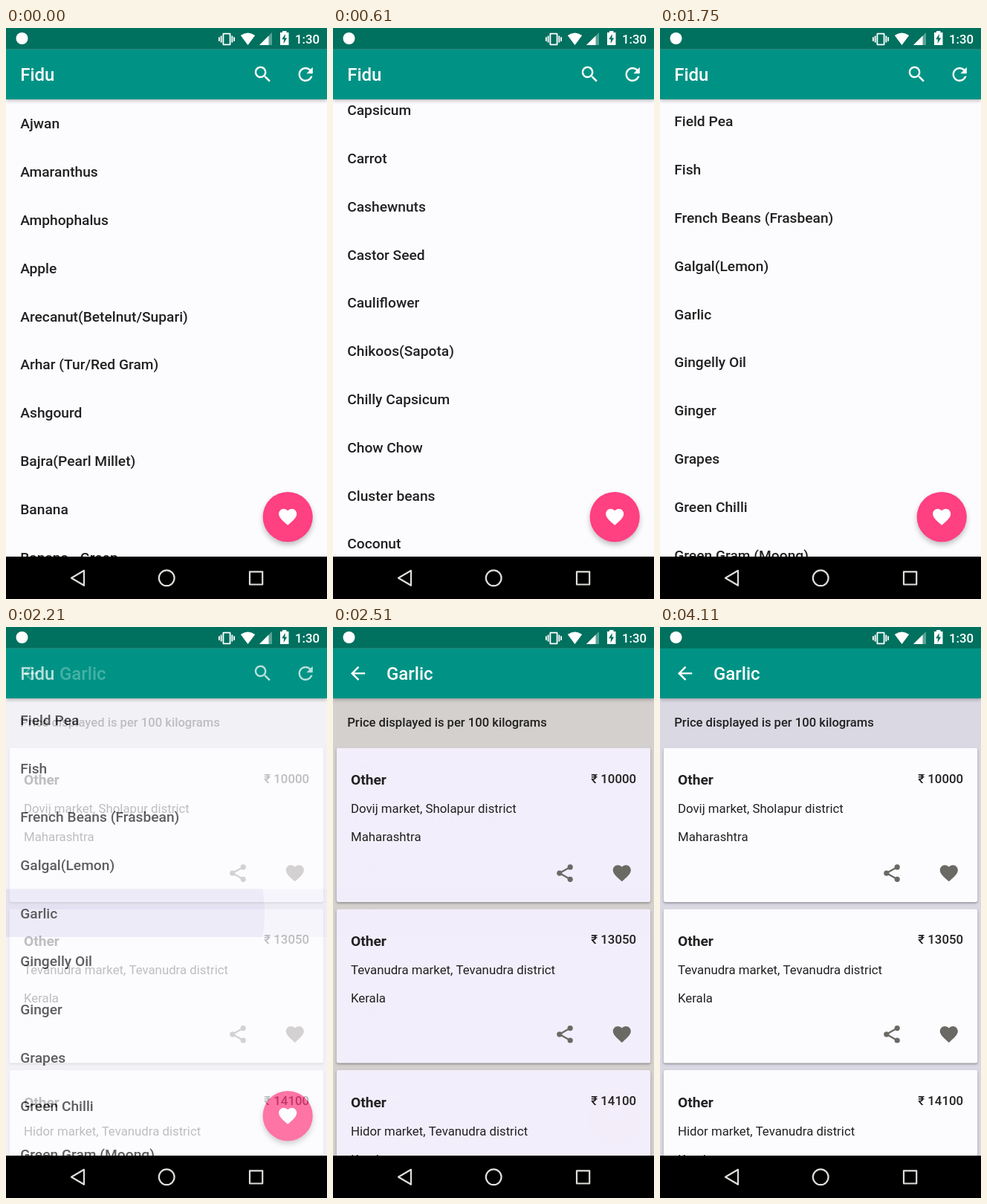
Animation of 432x768 px, one loop 5.1 s. Source, as an HTML page with a canvas:

```html
<!DOCTYPE html>
<html lang="en">
<head>
<meta charset="utf-8">
<title>Market prices</title>
<style>
  html, body { margin: 0; width: 100%; height: 100%; overflow: hidden; background: #000; }
  canvas { display: block; width: 432px; height: 768px; }
</style>
</head>
<body>
<canvas id="stage" width="432" height="768"></canvas>
<script>
const W = 432, H = 768, LOOP = 5100;
const STATUS_H = 28.8, BAR_END = 96, NAV_TOP = 711, ROW = 64.8;
const SCROLL_END = 3048.6;
const GREEN = '#009385', INK = '#212121', PAPER = '#fcfbfe';

const CROPS = ['Ajwan', 'Amaranthus', 'Amphophalus', 'Apple', 'Arecanut(Betelnut/Supari)',
  'Arhar (Tur/Red Gram)', 'Ashgourd', 'Bajra(Pearl Millet)', 'Banana', 'Banana - Green',
  'Beans', 'Beetroot', 'Bengal Gram(Gram)', 'Betal Leaves', 'Bhindi(Ladies Finger)',
  'Bitter gourd', 'Black Gram (Urd Beans)', 'Black pepper', 'Bottle gourd', 'Brinjal',
  'Bull', 'Cabbage', 'Capsicum', 'Carrot', 'Cashewnuts', 'Castor Seed', 'Cauliflower',
  'Chikoos(Sapota)', 'Chilly Capsicum', 'Chow Chow', 'Cluster beans', 'Coconut',
  'Coconut Oil', 'Coconut Seed', 'Coffee', 'Colacasia', 'Copra', 'Coriander(Leaves)',
  'Corriander seed', 'Cotton', 'Cowpea(Veg)', 'Cucumbar(Kheera)', 'Cummin Seed(Jeera)',
  'Drumstick', 'Dry Chillies', 'Duster Beans', 'Elephant Yam (Suran)', 'Field Pea', 'Fish',
  'French Beans (Frasbean)', 'Galgal(Lemon)', 'Garlic', 'Gingelly Oil', 'Ginger', 'Grapes',
  'Green Chilli', 'Green Gram (Moong)', 'Green Peas'];

const OFFERS = [
  ['₹ 10000', 'Dovij market, Sholapur district', 'Maharashtra'],
  ['₹ 13050', 'Tevanudra market, Tevanudra district', 'Kerala'],
  ['₹ 14100', 'Hidor market, Tevanudra district', 'Kerala']
];

// The picture only changes at these moments.
const STEPS = [0, 230, 310, 380, 460, 530, 610, 690, 760, 840, 920, 990, 1070, 1290,
  1750, 1830, 1900, 1980, 2060, 2130, 2210, 2280, 2360, 2430, 2510, 2590, 2660, 3120];

const ICONS = {
  heart: 'M12 21.35l-1.45-1.32C5.4 15.36 2 12.28 2 8.5 2 5.42 4.42 3 7.5 3c1.74 0 3.41.81 4.5 2.09C13.09 3.81 14.76 3 16.5 3 19.58 3 22 5.42 22 8.5c0 3.78-3.4 6.86-8.55 11.54L12 21.35z',
  search: 'M15.5 14h-.79l-.28-.27C15.41 12.59 16 11.11 16 9.5 16 5.91 13.09 3 9.5 3S3 5.91 3 9.5 5.91 16 9.5 16c1.61 0 3.09-.59 4.23-1.57l.27.28v.79l5 4.99L20.49 19l-4.99-5zm-6 0C7.01 14 5 11.99 5 9.5S7.01 5 9.5 5 14 7.01 14 9.5 11.99 14 9.5 14z',
  refresh: 'M17.65 6.35C16.2 4.9 14.21 4 12 4c-4.42 0-7.99 3.58-7.99 8s3.57 8 7.99 8c3.73 0 6.84-2.55 7.73-6h-2.08c-.82 2.33-3.04 4-5.65 4-3.31 0-6-2.69-6-6s2.69-6 6-6c1.66 0 3.14.69 4.22 1.78L13 11h7V4l-2.35 2.35z',
  back: 'M20 11H7.83l5.59-5.59L12 4l-8 8 8 8 1.41-1.41L7.83 13H20v-2z',
  vibrate: 'M0 15h2V9H0zM3 17h2V7H3zM22 9v6h2V9zM19 17h2V7h-2zM16.5 3h-9C6.67 3 6 3.67 6 4.5v15c0 .83.67 1.5 1.5 1.5h9c.83 0 1.5-.67 1.5-1.5v-15c0-.83-.67-1.5-1.5-1.5zM16 19H8V5h8z'
};
for (const name in ICONS) ICONS[name] = new Path2D(ICONS[name]);

const stage = document.getElementById('stage').getContext('2d');
const clamp = x => Math.max(0, Math.min(1, x));

function text(c, str, x, y, size, weight, color, align = 'left') {
  c.font = `${weight} ${size}px Roboto, sans-serif`;
  c.textAlign = align;
  c.fillStyle = color;
  c.fillText(str, x, y);
}

function icon(c, name, cx, cy, color, scale = 1.2) {
  c.save();
  c.translate(cx, cy);
  c.scale(scale, scale);
  c.translate(-12, -12);
  c.fillStyle = color;
  c.fill(ICONS[name], 'evenodd');
  c.restore();
}

function rect(c, x, y, w, h, color) {
  c.fillStyle = color;
  c.fillRect(x, y, w, h);
}

function disc(c, x, y, r, color) {
  c.fillStyle = color;
  c.beginPath();
  c.arc(x, y, r, 0, 7);
  c.fill();
}

function poly(c, points) {
  c.beginPath();
  points.forEach(p => c.lineTo(p[0], p[1]));
  c.closePath();
}

function shadow(c, alpha, blur, dy) {
  c.shadowColor = `rgba(0,0,0,${alpha})`;
  c.shadowBlur = blur;
  c.shadowOffsetY = dy;
}

function toolbar(c, title, x) {
  c.save();
  shadow(c, 0.3, 5, 2);
  rect(c, 0, STATUS_H, W, BAR_END - STATUS_H, GREEN);
  c.restore();
  text(c, title, x, 71, 24, 500, '#fff');
}

function statusBar(c) {
  rect(c, 0, 0, W, STATUS_H, '#00705f');
  disc(c, 21.5, 14, 8, '#fff');
  icon(c, 'vibrate', 297, 15, '#fff', 0.92);
  c.fillStyle = '#fff';
  c.beginPath();
  c.moveTo(325.5, 23);
  c.lineTo(315.8, 10);
  c.quadraticCurveTo(325.5, 2.8, 335.2, 10);
  c.fill();
  c.fillStyle = 'rgba(255,255,255,.35)';
  poly(c, [[341, 23], [358, 23], [358, 6]]);
  c.fill();
  c.fillStyle = '#fff';
  poly(c, [[341, 23], [353.5, 23], [353.5, 10.5]]);
  c.fill();
  rect(c, 369, 6, 11.5, 17, '#fff');
  rect(c, 372, 4, 5.5, 2, '#fff');
  c.fillStyle = '#00705f';
  poly(c, [[375.8, 8], [371.2, 15.3], [374, 15.3], [373.6, 21], [378.2, 13.4], [375.4, 13.4]]);
  c.fill();
  text(c, '1:30', 389, 21, 16.8, 500, '#fff');
}

function navBar(c) {
  rect(c, 0, NAV_TOP, W, H - NAV_TOP, '#000');
  c.strokeStyle = '#deded9';
  c.lineWidth = 2.2;
  c.lineJoin = 'round';
  poly(c, [[105, 729.8], [88, 739.8], [105, 749.8]]);
  c.stroke();
  c.beginPath();
  c.arc(216.2, 739.8, 10.4, 0, 7);
  c.stroke();
  c.strokeRect(328, 731.3, 17.2, 17.2);
}

// A finger drag that speeds up, then a fling that slows down.
function scrollAt(t) {
  if (t < 480) return 500 * clamp((t - 180) / 300) ** 2;
  return 500 + (SCROLL_END - 500) * (1 - (1 - clamp((t - 480) / 610)) ** 1.93);
}

function ripple(c, t, top) {
  if (t <= 1750) return;
  c.save();
  c.beginPath();
  c.rect(0, top, W, ROW);
  c.clip();
  rect(c, 0, top, W, ROW, `rgba(70,50,190,${0.04 * clamp((t - 1750) / 150)})`);
  disc(c, 150, top + ROW / 2, 198 * (t - 1750) / 460, 'rgba(70,50,190,.07)');
  c.restore();
}

function listPage(c, t) {
  const scroll = scrollAt(t);
  rect(c, 0, 0, W, H, PAPER);
  ripple(c, t, BAR_END + CROPS.indexOf('Garlic') * ROW - scroll);
  CROPS.forEach((crop, i) => {
    const y = Math.round(135.4 + i * ROW - scroll);
    if (y > 60 && y < 740) text(c, crop, 19.2, y, 19.2, 500, INK);
  });
  toolbar(c, 'Fidu', 19.2);
  icon(c, 'search', 345.6, 62.4, '#fff');
  icon(c, 'refresh', 403.2, 62.4, '#fff');
  c.save();
  shadow(c, 0.24, 7, 4);
  disc(c, 379.2, 657.6, 33.6, '#ff4081');
  c.restore();
  icon(c, 'heart', 379.2, 657.6, '#fff');
}

function shareIcon(c, x, y, color) {
  const dots = [[7.2, -8.2], [-7.2, 0], [7.2, 8.2]];
  c.strokeStyle = color;
  c.lineWidth = 2.3;
  c.beginPath();
  dots.forEach(d => c.lineTo(x + d[0], y + d[1]));
  c.stroke();
  dots.forEach(d => disc(c, x + d[0], y + d[1], 3.6, color));
}

function offerCard(c, [price, market, state], top, color) {
  const grey = '#6b6963';
  c.save();
  shadow(c, 0.35, 3, 1.5);
  c.fillStyle = color;
  c.beginPath();
  c.roundRect(4.8, top, 422.4, 207.2, 2.4);
  c.fill();
  c.restore();
  text(c, 'Other', 24, top + 49.5, 19.2, 700, INK);
  text(c, price, 408, top + 47, 16.8, 500, INK, 'right');
  text(c, market, 24, top + 87.5, 16.8, 400, INK);
  text(c, state, 24, top + 125.5, 16.8, 400, INK);
  shareIcon(c, 312, top + 168.4, grey);
  icon(c, 'heart', 388.8, top + 168.4, grey);
}

function makeDetail(page, card) {
  const canvas = document.createElement('canvas');
  canvas.width = W;
  canvas.height = H;
  const c = canvas.getContext('2d');
  rect(c, 0, STATUS_H, W, H, page);
  text(c, 'Price displayed is per 100 kilograms', 19.2, 133.5, 16.6, 500, INK);
  OFFERS.forEach((offer, i) => offerCard(c, offer, 162.7 + i * 216.7, card));
  toolbar(c, 'Garlic', 72);
  icon(c, 'back', 33.6, 62.4, '#fff');
  return canvas;
}

const dimDetail = makeDetail('#d4d0cd', '#f3eefb');
const clearDetail = makeDetail('#dad8e3', PAPER);

function draw(t) {
  const fade = 1 - (1 - clamp((t - 2130) / 385)) ** 1.4;
  const dim = t >= 2280 && t < 3120;
  if (fade < 1) listPage(stage, t);
  if (fade > 0) {
    stage.globalAlpha = fade;
    stage.drawImage(dim ? dimDetail : clearDetail, 0, 0);
    stage.globalAlpha = 1;
  }
  statusBar(stage);
  navBar(stage);
}

const start = performance.now();
function tick() {
  const t = (performance.now() - start) % LOOP;
  draw(STEPS.filter(s => s <= t).pop());
  requestAnimationFrame(tick);
}
tick();
</script>
</body>
</html>
```
